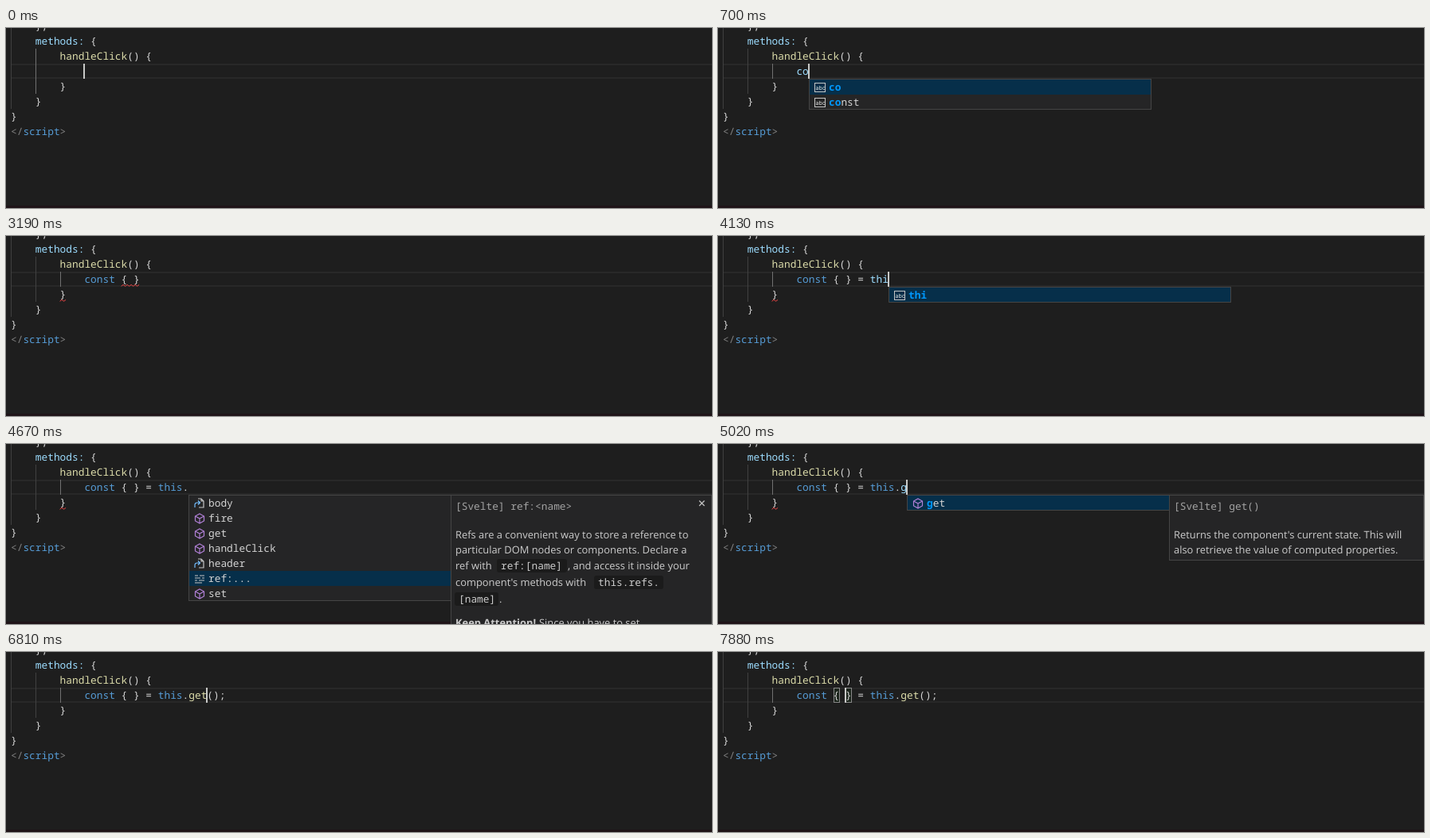
Write an HTML page that moves like this. It is 886 by 227 pixels and loops after 8 s.

```html
<!DOCTYPE html>
<html lang="en">
<head>
<meta charset="utf-8">
<title>Editor typing</title>
<style>
  html, body { margin: 0; width: 100%; height: 100%; overflow: hidden; background: #1e1e1e; }
  svg { display: block; }
  text { white-space: pre; text-rendering: geometricPrecision; fill: #d4d4d4; }
  .mono { font: 12.833px "Noto Sans Mono", "DejaVu Sans Mono", monospace; }
  .prose { font: 12.9px "Open Sans", "Noto Sans", sans-serif; fill: #ccc; }
  .bold { font-weight: 700; }
</style>
</head>
<body>
<svg id="stage" width="886" height="227" viewBox="0 0 886 227"></svg>
<script>
const LOOP = 8000, CHAR = 7.7, LEFT = 6, ROW = 19, LINE_TOP = 45;
const BLUE = '#569cd6', SKY = '#9cdcfe', YELLOW = '#dcdcaa', PLAIN = '#d4d4d4', GREY = '#808080';

const colX = col => LEFT + col * CHAR;
const esc = s => s.replace(/&/g, '&amp;').replace(/</g, '&lt;').replace(/>/g, '&gt;');
const rect = (x, y, w, h, fill, more = '') =>
  `<rect x="${x}" y="${y}" width="${w}" height="${h}" fill="${fill}" ${more}/>`;
const frame = (x, y, w, h, fill, stroke) =>
  rect(x + .5, y + .5, w - 1, h - 1, fill, `stroke="${stroke}"`);
const label = (x, y, cls, s, fill) =>
  `<text class="${cls}" x="${x}" y="${y}"${fill ? ` style="fill:${fill}"` : ''}>${esc(s)}</text>`;
const tokens = (col, y, parts) =>
  `<text class="mono" x="${colX(col)}" y="${y}">` +
  parts.map(([s, fill]) => `<tspan fill="${fill}">${esc(s)}</tspan>`).join('') + '</text>';

function highlight(code) {
  const found = code.match(/const\b|this\b|get(?=\()|[a-z]+|[^a-z]+/g) || [];
  return found.map((s, i) => {
    if (s === 'const' || s === 'this') return [s, BLUE];
    if (s === 'get' && (found[i + 1] || '')[0] === '(') return [s, YELLOW];
    return [s, /[a-z]/.test(s) ? SKY : PLAIN];
  });
}

function squiggle(col, len, bottom) {
  const x0 = colX(col), x1 = x0 + len * CHAR;
  let d = `M${x0} ${bottom - .7}`;
  for (let x = x0 + 2.5, up = true; x < x1 + .5; x += 2.5, up = !up)
    d += `L${x.toFixed(1)} ${bottom - (up ? 2.6 : .7)}`;
  return `<path d="${d}" fill="none" stroke="#ea4646"/>`;
}

// Icons are drawn around their own centre.
const stroke = (d, c) => `<path d="${d}" fill="none" stroke="${c}" stroke-width="1.2"/>`;
const ICONS = {
  word: frame(-7, -6, 14, 12, 'none', '#c5c5c5') +
    '<text x="-5.4" y="2.6" style="font:7px Inter,sans-serif;fill:#e0e0e0">abc</text>',
  cube: stroke('M0-6L5.5-3V3L0 6L-5.5 3V-3ZM-5.5-3L0 0L5.5-3M0 0V6', '#b180d7'),
  link: stroke('M-2-6H2L5-3V5H-1M2-6V-3H5', '#c5c5c5') +
    stroke('M-6 5V2Q-6-1-3-1H0M-2-3.5L.5-1L-2 1.5', '#75beff'),
  snip: stroke('M-6-4H-2M0-4H6M-6-1H1M3-1H6M-6 2H-3M-1 2H6M-6 5H3', '#c5c5c5')
};

const words = (col, ...list) =>
  ({ col, rows: list.map(s => ['word', s]), sel: 0, match: list[0] });
const MEMBERS = {
  col: 29, sel: 5, match: '', doc: 'ref',
  rows: [['link', 'body'], ['cube', 'fire'], ['cube', 'get'], ['cube', 'handleClick'],
    ['link', 'header'], ['snip', 'ref:...'], ['cube', 'set']]
};
const getter = (col, match) => ({ col, rows: [['cube', 'get']], sel: 0, match, doc: 'get' });

function pill(x, w, y, s) {
  return rect(x, y - 13, w, 17, '#1b1b1b', 'rx="3"') + label(x + 5, y, 'mono', s, '#ccc');
}

function docPanel(x, kind) {
  const tx = x + 6, prose = (y, s, px = tx) => label(px, y, 'prose', s);
  const head = s => label(tx, 83, 'mono', s, '#a3a3a3');
  const box = h => frame(x, 64, 886 - x, h, '#252526', '#454545');
  if (kind === 'get')
    return box(83) + head('[Svelte] get()') +
      prose(119, "Returns the component's current state. This will") +
      prose(138, 'also retrieve the value of computed properties.');
  return box(180) + head('[Svelte] ref:<name>') +
    stroke('M870 71.5L876.5 78M876.5 71.5L870 78', '#c5c5c5') +
    prose(119, 'Refs are a convenient way to store a reference to') +
    prose(138, 'particular DOM nodes or components. Declare a') +
    prose(158, 'ref with') + pill(616, 88, 158, 'ref:[name]') +
    prose(158, ', and access it inside your', 705) +
    prose(179, "component's methods with") + pill(738, 87, 179, 'this.refs.') +
    pill(563, 55, 200, '[name]') + prose(200, '.', 619) +
    label(tx, 230, 'prose bold', 'Keep Attention!') +
    prose(230, 'Since you have to set', 669);
}

function popup({ col, rows, sel, match, doc }) {
  const x = Math.round(colX(col)), w = doc ? 330 : 430;
  let out = rect(x, 64, w, rows.length * ROW + 1, '#252526') +
    rect(x, 65 + sel * ROW, w, ROW, '#062f4a');
  rows.forEach(([icon, name], i) => {
    const y = 79 + i * ROW;
    const hit = match && name.startsWith(match) ? match : '';
    out += `<g transform="translate(${x + 14} ${y - 4})">${ICONS[icon]}</g>` +
      `<text class="mono" x="${x + 25}" y="${y}"><tspan class="bold" fill="#0097fb">${hit}</tspan>` +
      `${name.slice(hit.length)}</text>`;
  });
  out += frame(x, 64, w, rows.length * ROW + 1, 'none', '#454545');
  return out + (doc ? docPanel(x + w - 1, doc) : '');
}

// Each step changes part of the editor state.
const type = (code, more) => ({ code, col: 12 + code.length, on: true, ...more });
const go = (col, more) => ({ col, on: true, ...more });
const FULL = 'const { } = this.get();';
const START = { code: '', col: 12, on: true, list: null, pair: [], wave: null, brace: false };
const STEPS = [
  [30, { on: false }],
  [510, type('c')],
  [560, { list: words(13, 'c', 'const', 'handleClick', 'script') }],
  [620, type('co')],
  [660, { list: words(14, 'co', 'const') }],
  [720, type('con')],
  [760, { list: words(15, 'con', 'const') }],
  [800, { wave: [12, 3] }],
  [850, type('cons', { list: words(16, 'cons', 'const') })],
  [900, type('const')],
  [950, { list: words(17, 'const') }],
  [1050, type('const ', { list: null })],
  [1190, { wave: [12, 5], brace: true }],
  [1500, { on: false }],
  [1700, type('const {}', { col: 19, wave: null })],
  [1750, { pair: [18, 19], wave: [18, 2] }],
  [2160, type('const { }', { col: 20, pair: [18, 20] })],
  [2210, { wave: [18, 3] }],
  [2520, go(21)],
  [2670, type('const { } ')],
  [2760, { pair: [] }],
  [3190, { on: false }],
  [3500, type('const { } =')],
  [3570, { wave: null }],
  [3640, type('const { } = ')],
  [3950, type('const { } = t')],
  [4000, { list: words(25, 't') }],
  [4050, type('const { } = th')],
  [4090, { list: words(26, 'th') }],
  [4130, type('const { } = thi', { list: words(27, 'thi') })],
  [4240, type('const { } = this', { list: words(28, 'this') })],
  [4290, type('const { } = this.', { list: null })],
  [4370, { list: MEMBERS }],
  [4670, { on: false }],
  [4950, type('const { } = this.g')],
  [5000, { list: getter(30, 'g') }],
  [5080, type('const { } = this.ge', { list: getter(31, 'ge') })],
  [5150, { brace: false }],
  [5220, type('const { } = this.get', { list: getter(32, 'get') })],
  [5700, { on: false }],
  [6020, type('const { } = this.get()', { col: 33, list: null })],
  [6080, { pair: [32, 33] }],
  [6400, go(34)],
  [6480, type(FULL, { pair: [] })],
  [6810, go(32)],
  [6860, { pair: [32, 33] }],
  [6920, go(29)],
  [6970, { pair: [] }],
  [7040, go(28)],
  [7220, go(24)],
  [7420, go(22)],
  [7730, go(20)],
  [7790, { pair: [18, 20] }]
];

const states = [{ at: 0, ...START }];
for (const [at, patch] of STEPS) states.push({ ...states[states.length - 1], ...patch, at });

function draw(s) {
  const idle = !s.code;
  let out = rect(0, 0, 886, 227, '#1e1e1e') + rect(0, 224, 886, 3, '#1f1418') +
    rect(6, LINE_TOP, 880, 2, '#282828') + rect(6, LINE_TOP + 17, 880, 2, '#282828') +
    rect(6, 0, 1, 102, '#404040') + rect(37, 26, 1, 57, idle ? '#707070' : '#404040');
  if (!idle) out += rect(68, LINE_TOP, 1, ROW, '#707070');
  for (const c of s.pair)
    out += frame(Math.round(colX(c)), LINE_TOP, 8, ROW, '#1c251c', '#888');
  out += tokens(4, 2, [['},', PLAIN]]) +
    tokens(4, 21, [['methods:', SKY], [' {', PLAIN]]) +
    tokens(8, 40, [['handleClick', YELLOW], ['() {', PLAIN]]) +
    tokens(12, 59, highlight(s.code)) +
    tokens(8, 78, [['}', PLAIN]]) +
    tokens(4, 97, [['}', PLAIN]]) +
    tokens(0, 116, [['}', PLAIN]]) +
    tokens(0, 135, [['</', GREY], ['script', BLUE], ['>', GREY]]);
  if (s.wave) out += squiggle(...s.wave, 64);
  if (s.brace) out += squiggle(8, 1, 83);
  if (s.on) out += rect(Math.round(colX(s.col)) - 1, LINE_TOP, 2, ROW, '#c8c9c7');
  if (s.list) out += popup(s.list);
  return out;
}

const stage = document.getElementById('stage');
let shown = null, begin = null;
function tick(now) {
  if (begin === null) begin = now;
  const t = (now - begin) % LOOP;
  let state = states[0];
  for (const s of states) if (s.at <= t) state = s;
  if (state !== shown) stage.innerHTML = draw(shown = state);
  requestAnimationFrame(tick);
}
stage.innerHTML = draw(shown = states[0]);
requestAnimationFrame(tick);
</script>
</body>
</html>
```
